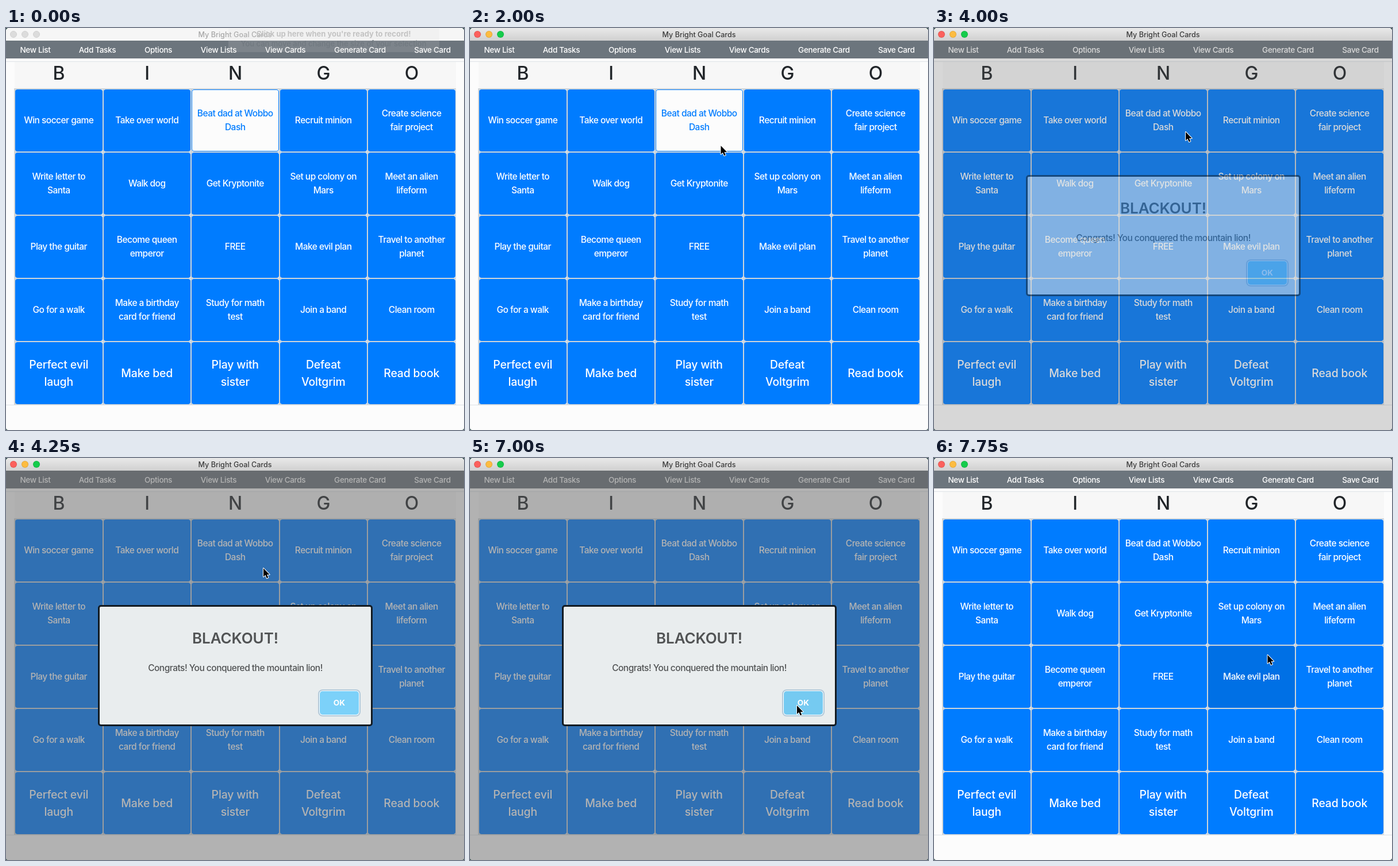
Write an HTML page that moves like this. It is 797 by 700 pixels and loops after 8000 ms.

```html
<!DOCTYPE html>
<html lang="en">
<head>
<meta charset="utf-8">
<title>Bingo card</title>
<style>
html, body { margin: 0; width: 100%; height: 100%; overflow: hidden; background: #24443f; }
body { font: 450 15.5px/24px Inter, "Open Sans", sans-serif; letter-spacing: -.52px; }
#stage { position: absolute; left: 0; top: 0; width: 797px; height: 700px; overflow: hidden;
  background: #fcfcfc; border-radius: 5px 5px 4px 4px; }
#stage div, #stage svg { position: absolute; box-sizing: border-box; }
#stage .label { transform: translate(-50%, -50%); white-space: pre; text-align: center; }

#bar { left: 0; top: 0; width: 797px; height: 22px; background: #f6f6f6; }
#bar .label { left: 398.5px; top: 11.5px; font-size: 12.6px; letter-spacing: 0; color: #a6a6a6; }
#bar .light { top: 5px; width: 12px; height: 12px; border-radius: 50%; background: #dcdcdc; border: 1px solid #d0d0d0; }
#bar.active { background: linear-gradient(#e9e9e9, #d0d0d0); }
#bar.active .label { color: #3c3c3c; }
#bar.active .light { background: var(--c); border-color: rgba(0, 0, 0, .1); }

#nav { left: 0; top: 22px; width: 797px; height: 31px; background: #6c757d; color: #fff;
  font-size: 13.55px; letter-spacing: -.33px; }
#nav .label { top: 16px; }

#head { left: 15px; top: 59px; width: 768px; height: 46px; background: #f7f7f7; color: #212529;
  font-size: 32px; font-weight: 500; letter-spacing: 0; }
#head .label { top: 20px; }
.rule { left: 0; width: 797px; height: 1px; background: #dee2e6; }
#table { left: 14px; top: 105px; width: 769px; height: 552px; background:
  repeating-linear-gradient(#d0d5d9 0 2px, transparent 2px 110px),
  repeating-linear-gradient(90deg, #d0d5d9 0 3px, transparent 3px 153.5px), #fcfcfc; }
.cell { width: 151.5px; height: 108px; border-radius: 4px; background: #007cff; color: #fff; }
.cell .label { left: 50%; top: 50%; }
.cell.big { font-size: 19.4px; line-height: 30px; letter-spacing: -.15px; }
.cell.open { background: #fcfcfc; color: #007cff; border: 1px solid #007cff; }
.cell.half { background: #7ebbfd; border: 1px solid #007cff; }
.cell.hover { background: #0070e5; }

#tip { left: 387px; top: 1px; width: 367px; height: 41px; background: rgba(208, 208, 208, .16); letter-spacing: 0; }
#tip .label { left: 183px; font-size: 13px; }

#shade { left: 0; top: 22px; width: 797px; height: 678px; background: rgba(99, 99, 99, .486); }
#modal { left: 160px; top: 256px; width: 478px; height: 211px; border: 3px solid #131b22; border-radius: 5px;
  background: #e9edee; color: #515354; }
#modal .label { left: 236px; }
#modal .title { top: 55px; font-size: 26px; font-weight: 600; letter-spacing: -.1px; }
#modal .text { top: 106.5px; }
#ok { left: 383px; top: 146.5px; width: 68px; height: 41px; border-radius: 5px; background: #7cd1f9;
  box-shadow: 0 0 0 1px #fff, 0 0 0 3px rgba(43, 114, 165, .29); }
#ok.hover { background: #75caf1; }
#modal #ok .label { left: 34px; top: 20.5px; font-size: 13.6px; font-weight: 700; letter-spacing: 0; color: #fff; }
#modal.ghost { background: rgba(255, 255, 255, .075); border-color: rgba(0, 20, 60, .09); color: rgba(0, 50, 130, .34); }
#modal.ghost #ok { background: rgba(0, 92, 205, .32); box-shadow: none; }
#modal.ghost #ok .label { color: transparent; }
#cursor { left: 0; top: 0; width: 16px; height: 22px; overflow: visible; }
</style>
</head>
<body>
<div id="stage"></div>
<script>
const LOOP = 8000;
const stage = document.getElementById('stage');

function add(parent, id, cls = '', css = {}, text = '') {
  const el = document.createElement('div');
  if (id) el.id = id;
  el.className = cls;
  Object.assign(el.style, css);
  el.textContent = text;
  parent.append(el);
  return el;
}
const label = (parent, text, css, cls = '') => add(parent, '', 'label ' + cls, css, text);

// Window title and menu
const bar = add(stage, 'bar');
['#fc605c', '#fdbc40', '#15cc4b'].forEach((color, i) => {
  add(bar, '', 'light', { left: 7 + 20 * i + 'px' }).style.setProperty('--c', color);
});
label(bar, 'My Bright Goal Cards');

const nav = add(stage, 'nav');
const menu = { 'New List': 51, 'Add Tasks': 159, 'Options': 265, 'View Lists': 370,
  'View Cards': 486, 'Generate Card': 616, 'Save Card': 742 };
for (const name in menu) label(nav, name, { left: menu[name] + 'px' });

// Card
const STEP_X = 153.5, STEP_Y = 110;
const head = add(stage, 'head');
[...'BINGO'].forEach((ch, i) => label(head, ch, { left: 77 + STEP_X * i + 'px' }));
add(stage, '', 'rule', { top: '58px' });
add(stage, 'table');
add(stage, '', 'rule', { top: '656px' });

const tasks = [
  'Win soccer game', 'Take over world', 'Beat dad at Wobbo\nDash', 'Recruit minion', 'Create science\nfair project',
  'Write letter to\nSanta', 'Walk dog', 'Get Kryptonite', 'Set up colony on\nMars', 'Meet an alien\nlifeform',
  'Play the guitar', 'Become queen\nemperor', 'FREE', 'Make evil plan', 'Travel to another\nplanet',
  'Go for a walk', 'Make a birthday\ncard for friend', 'Study for math\ntest', 'Join a band', 'Clean room',
  'Perfect evil\nlaugh', 'Make bed', 'Play with\nsister', 'Defeat\nVoltgrim', 'Read book'
];
const cells = tasks.map((task, i) => {
  const row = Math.floor(i / 5);
  const cell = add(stage, '', 'cell', {
    left: 16 + STEP_X * (i % 5) + 'px', top: 107 + STEP_Y * row + 'px'
  });
  cell.classList.toggle('big', row === 4);
  label(cell, task);
  return cell;
});

// Recorder hint
const tip = add(stage, 'tip');
label(tip, "Click up here when you're ready to record!", { top: '8.5px', color: '#c3c3c3', fontWeight: 700 });
label(tip, 'You can move and change the size of your selection', { top: '25.5px', color: '#717980' });

// Dialog
const shade = add(stage, 'shade');
const modal = add(stage, 'modal');
label(modal, 'BLACKOUT!', {}, 'title');
label(modal, 'Congrats! You conquered the mountain lion!', {}, 'text');
const ok = add(modal, 'ok');
label(ok, 'OK');

stage.insertAdjacentHTML('beforeend', `<svg id="cursor">
  <path d="M0 0V14.8L3.4 11.7L5.8 17.3L8.3 16.3L6 10.9H10.6Z" fill="#000" stroke="#fff"
    stroke-width="2" stroke-linejoin="round" paint-order="stroke"/></svg>`);
const cursor = document.getElementById('cursor');

// Each row: start time, then the values held from there on
const cursorSteps = [
  [0, -50, -50], [750, 541, 80], [1000, 444, 147], [1250, 429, 161], [1500, 436.5, 205],
  [3250, 438, 181], [4250, 448, 192], [4500, 469, 202], [4750, 490, 225], [5000, 573, 314],
  [5500, 577, 339], [5750, 576, 392], [6000, 570, 424], [6250, 569, 431], [7750, 580.5, 343]
];
const shadeSteps = [[0, 0], [4000, .5], [4250, 1], [7250, .45], [7500, 0]];
const modalSteps = [[0, 0], [4000, .5], [4250, 1], [7500, 0]];

const at = (steps, t) => steps.findLast(step => step[0] <= t).slice(1);

function draw(t) {
  const [x, y] = at(cursorSteps, t);
  cursor.style.transform = `translate(${x}px, ${y}px)`;
  shade.style.opacity = at(shadeSteps, t)[0];
  modal.style.opacity = at(modalSteps, t)[0];
  modal.classList.toggle('ghost', t >= 7250);
  ok.classList.toggle('hover', t >= 6000);
  bar.classList.toggle('active', t >= 2000);
  tip.style.display = t < 250 ? '' : 'none';
  cells[2].classList.toggle('open', t < 2750);
  cells[2].classList.toggle('half', t >= 2750 && t < 3000);
  cells[13].classList.toggle('hover', t >= 7750);
}

const start = performance.now();
function tick() {
  draw((performance.now() - start) % LOOP);
  requestAnimationFrame(tick);
}
tick();
</script>
</body>
</html>
```
